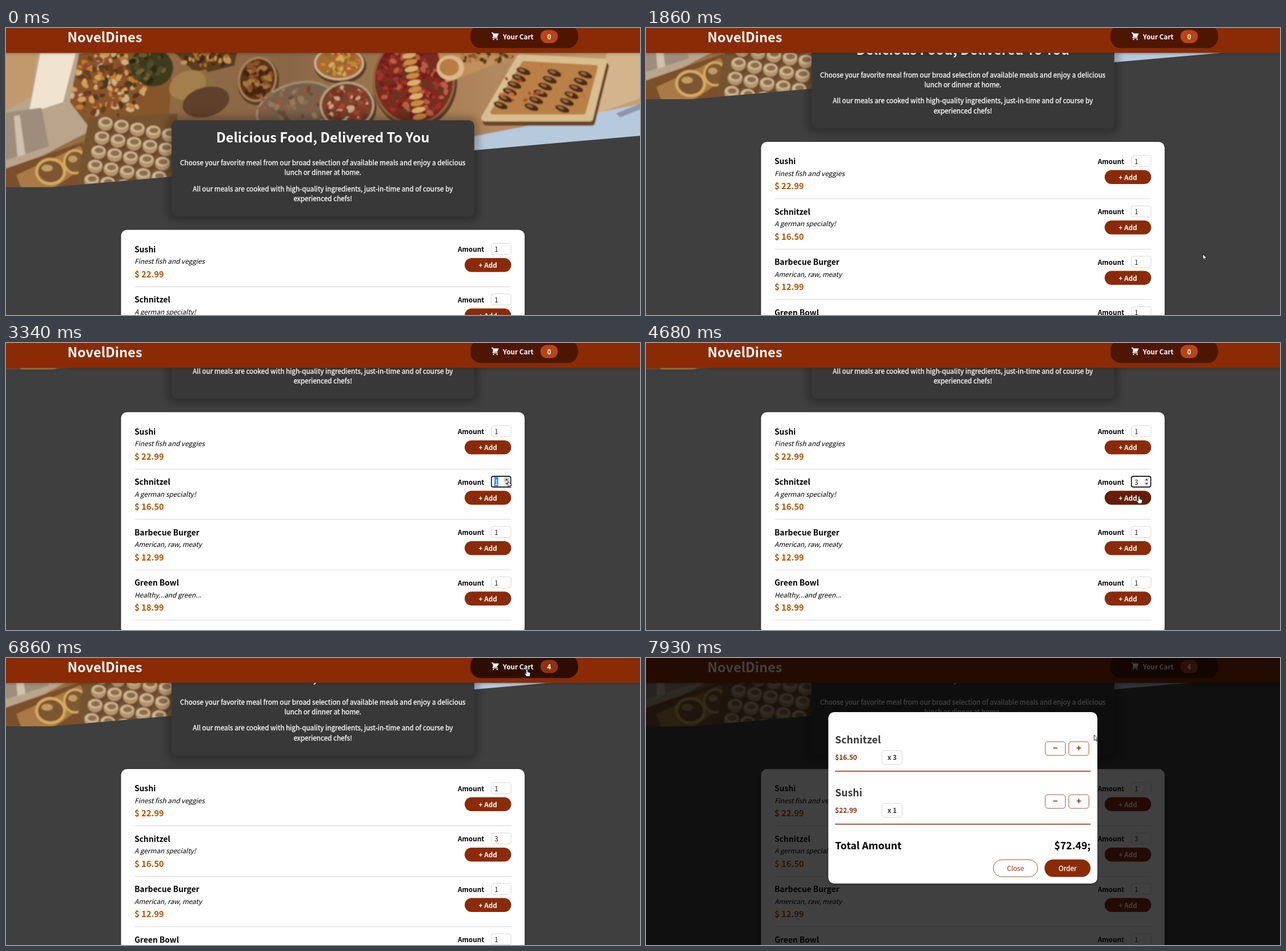
These frames come from a looping animation (1110x504 px, 8000 ms). An HTML page:

```html
<!DOCTYPE html>
<html lang="en">
<head>
<meta charset="utf-8">
<title>Meal ordering</title>
<style>
  html, body { margin: 0; width: 100%; height: 100%; overflow: hidden; background: #3f3f3f; }
  svg { display: block; width: 100vw; height: 100vh; }
  text { font-family: "Noto Sans CJK JP", "Noto Sans JP", "Noto Sans CJK SC", "Noto Sans", sans-serif; white-space: pre; }
  .intro { stroke: #fff; stroke-width: .3px; }
</style>
</head>
<body>
<svg id="stage" viewBox="0 0 1110 504" xmlns="http://www.w3.org/2000/svg"></svg>
<script>
const LOOP = 8000;
const REM = 11.78;
const MID = 554.7;
const RUST = '#8a2b06';
const ROW_TOP = 377.9, ROW_STEP = 88.5;

// ---- markup helpers ----
const text = (x, y, s, o = {}) =>
  `<text x="${x}" y="${y}" font-size="${o.size || REM}" font-weight="${o.bold ? 700 : 400}"` +
  ` fill="${o.fill || '#000'}" text-anchor="${o.anchor || 'start'}"` +
  `${o.italic ? ' font-style="italic"' : ''}${o.id ? ` id="${o.id}"` : ''}>${s}</text>`;
const rect = (x, y, w, h, r, fill, extra = '') =>
  `<rect x="${x}" y="${y}" width="${w}" height="${h}" rx="${r}" fill="${fill}" ${extra}/>`;
const oval = (x, y, rx, ry, fill, rot = 0) =>
  `<ellipse cx="${x}" cy="${y}" rx="${rx}" ry="${ry}" fill="${fill}" transform="rotate(${rot} ${x} ${y})"/>`;
const poly = (points, fill, extra = '') => `<polygon points="${points}" fill="${fill}" ${extra}/>`;
const outline = (x, y, w, h, r, color, width = 0.8) =>
  rect(x, y, w, h, r, '#fff', `stroke="${color}" stroke-width="${width}"`);

// ---- buffet picture ----
let seed = 7;
const rand = () => (seed = (seed * 16807) % 2147483647) / 2147483647;

function scatter(cx, cy, rx, ry, n, size, colors) {
  let out = '';
  for (let i = 0; i < n; i++) {
    const a = rand() * Math.PI * 2, d = Math.sqrt(rand());
    const x = (cx + Math.cos(a) * d * rx).toFixed(1), y = (cy + Math.sin(a) * d * ry).toFixed(1);
    const r = size * (0.6 + rand() * 0.7);
    out += oval(x, y, r.toFixed(1), (r * 0.65).toFixed(1), colors[i % colors.length], Math.round(rand() * 180));
  }
  return out;
}

function cups() {
  let out = '';
  for (let r = 0; r < 5; r++) {
    for (let c = 0; c < 5; c++) {
      const x = 174 + c * 28 - r * 6, y = 168 + r * 25 + c * 5;
      out += oval(x + 2, y + 6, 14, 13, '#6b4a2e') + oval(x, y, 13, 12, '#b3946d') +
        oval(x, y - 3, 12, 8, '#d0b795') + oval(x + 1, y - 3, 8, 5, '#8d6e4c');
    }
  }
  return out;
}

function rolls() {
  let out = '';
  for (let r = 0; r < 3; r++) {
    for (let i = 0; i < 6; i++) {
      const x = 866 + r * 54 + i * 8, y = 136 - i * 12 + r * 3;
      out += oval(x, y, 13, 5.5, '#4b2a17', 20) + oval(x - 3, y - 2, 6, 2, '#94704c', 20);
    }
  }
  return out + scatter(945, 105, 82, 42, 12, 5, ['#b5452a', '#cf6a3d']);
}

function bowl(x, y, rx, ry, rim, fill, n, size, colors, rot = 0) {
  return oval(x + 2, y + 4, rx + 2, ry + 2, '#5b3c24', rot) + oval(x, y, rx, ry, rim, rot) +
    oval(x, y, rx - 4, ry - 4, fill, rot) + scatter(x, y, rx - 9, ry - 9, n, size, colors);
}

const photo = () => `<g clip-path="url(#slant)"><g filter="url(#soft)">
  ${rect(-10, 0, 1130, 300, 0, 'url(#table)')}
  ${poly('-10,40 135,40 112,130 150,180 100,205 -10,265', '#b9a48c')}
  ${poly('-10,40 55,40 45,120 -10,150', '#c09a6c')}
  ${poly('60,44 122,44 100,130 40,150', '#f0e3cf')}
  ${poly('-10,150 62,140 75,208 -10,235', '#9f8d7b')}
  ${poly('14,155 24,153 34,222 20,226', '#d0c2af')}
  ${poly('-10,250 134,200 156,236 130,300 -10,300', '#7a5029')}
  ${poly('18,258 130,207 146,238 70,290 30,290', '#a97a45')}
  ${oval(78, 252, 27, 24, '#d6ab60')}${oval(78, 252, 22, 19, '#7b5530')}${oval(72, 246, 10, 6, '#c39b60')}
  ${oval(121, 235, 21, 22, '#d6ab60')}${oval(121, 235, 17, 18, '#805931')}${oval(117, 230, 8, 6, '#c39b60')}
  ${poly('128,44 250,44 290,90 285,165 150,180 112,130', '#86552b')}
  ${scatter(180, 105, 66, 62, 170, 6, ['#c77830', '#6b3c1a', '#d39f5c', '#8e4b2a', '#4c3a1e', '#cdb289'])}
  ${oval(255, 68, 38, 34, '#3c3b1e', 20)}${scatter(250, 66, 32, 28, 34, 6, ['#4f4a26', '#2c2a17', '#6f5f30'])}
  ${poly('145,158 300,150 300,290 120,290', '#74522f')}
  ${cups()}
  ${poly('292,40 405,40 400,66 335,82', '#5d3a1e')}${scatter(350, 54, 45, 14, 34, 5, ['#a56b2f', '#c4944f', '#3f2a18'])}
  ${poly('290,90 350,72 368,110 322,135 290,140', '#8d6d3f')}${oval(318, 100, 34, 24, '#a27f4c', -25)}
  ${oval(350, 130, 42, 26, '#60402a', -15)}
  ${bowl(440, 90, 34, 40, '#a58058', '#5a3219', 44, 6, ['#8a5229', '#a8743d', '#472411'], 15)}
  ${bowl(507, 140, 72, 44, '#a08c72', '#79614a', 44, 6, ['#95573c', '#8a6d50', '#684c38', '#96795c'], -18)}
  ${bowl(583, 62, 44, 30, '#c9b193', '#a86c2e', 64, 5, ['#d08438', '#7f6f33', '#b95a2d', '#d3a85c'])}
  ${bowl(597, 136, 48, 42, '#b59c7e', '#734329', 64, 5.5, ['#a8402f', '#c9a283', '#6d3423', '#8c3826'])}
  ${bowl(714, 92, 72, 78, '#93643f', '#7d2a1e', 140, 6, ['#a0302a', '#741d1c', '#b85b42', '#5c3a22'])}
  ${Array.from({ length: 10 }, (_, i) => oval(706 + i * 2, 48 + i * 12, 12, 5, i % 2 ? '#c98a42' : '#d9b06a', -12)).join('')}
  ${poly('755,40 920,40 835,72 770,96', '#c08f5c')}
  ${oval(778, 70, 24, 22, '#dbb888')}${oval(776, 69, 17, 15, '#b97b45')}
  ${scatter(842, 50, 45, 10, 30, 5, ['#8c5a2b', '#b7803f', '#573518'])}
  ${poly('1052,40 1120,40 1120,120 1035,150', '#d4b48c')}
  ${poly('820,190 1120,132 1120,205 810,225', '#b7c9dc')}${poly('1068,150 1120,129 1120,139 1075,157', '#8a97a8')}
  <g stroke-linejoin="round">
    ${poly('838,158 900,52 1046,60 1022,158', '#6b4526', 'stroke="#6b4526" stroke-width="13" transform="translate(3 7)"')}
    ${poly('838,158 900,52 1046,60 1022,158', '#d9bf90', 'stroke="#d9bf90" stroke-width="12"')}
    ${poly('852,148 907,62 1032,69 1011,148', '#b98146', 'stroke="#b98146" stroke-width="8"')}
  </g>
  ${rolls()}
</g></g>`;

// ---- page ----
const meals = [
  ['Sushi', 'Finest fish and veggies', '22.99'],
  ['Schnitzel', 'A german specialty!', '16.50'],
  ['Barbecue Burger', 'American, raw, meaty', '12.99'],
  ['Green Bowl', 'Healthy...and green...', '18.99'],
];

function meal([name, note, price], i) {
  const y = ROW_TOP + i * ROW_STEP;
  return text(225, y + 16, name, { size: 13.78, bold: 1 }) +
    text(225, y + 36.4, note, { italic: 1 }) +
    text(225, y + 60, '$ ' + price, { size: 14.72, bold: 1, fill: '#ad5502' }) +
    rect(225, y + 76, 659.5, 0.8, 0, '#ccc') +
    text(837.2, y + 15.1, 'Amount', { bold: 1, anchor: 'end' }) +
    outline(849.5, y + 0.4, 34.7, 19.4, 3.7, '#ccc') +
    (i === 1 ? activeField(y) : '') +
    text(855.2, y + 15.1, '1', { id: 'qty' + i, fill: '#222' }) +
    rect(803, y + 26.1, 81.5, 24.5, 12.2, RUST, `id="add${i}"`) +
    text(843.7, y + 43.5, '+ Add', { bold: 1, fill: '#fff', anchor: 'middle' });
}

const activeField = y => `
  <g id="ring">${outline(849.9, y + 0.7, 33.8, 18.8, 3.2, '#101010', 1.6)}</g>
  <g id="spin">${rect(871.5, y + 2.2, 10, 15.8, 0, '#efefef')}
    ${rect(871.5, y + 2.2, 10, 7.9, 0, '#d0d0d0', 'id="spinUp"')}${rect(871.5, y + 10.1, 10, 7.9, 0, '#d0d0d0', 'id="spinDown"')}
    <path d="M873.8 ${y + 7.9}l2.7-3.3 2.7 3.3zM873.8 ${y + 12.3}l2.7 3.3 2.7-3.3z" fill="#444"/></g>
  ${rect(854.9, y + 1.9, 7, 16.4, 0, '#3390ff', 'id="picked"')}`;

const intro = [
  [241.1, 'Choose your favorite meal from our broad selection of available meals and enjoy a delicious'],
  [258.1, 'lunch or dinner at home.'],
  [286.9, 'All our meals are cooked with high-quality ingredients, just-in-time and of course by'],
  [304, 'experienced chefs!'],
];

const page = () => `<g id="page">
  ${photo()}
  ${rect(282.2, 155.3, 545.2, 184, 16, '#000', 'opacity=".25" filter="url(#blurBig)"')}
  ${rect(289.7, 162, 530.2, 169, 10.3, '#383838')}
  ${text(MID, 201, 'Delicious Food, Delivered To You', { size: 23.55, bold: 1, fill: '#fff', anchor: 'middle' })}
  <g class="intro">${intro.map(([y, s]) => text(MID, y, s, { fill: '#fff', anchor: 'middle' })).join('')}</g>
  ${rect(201.4, 355.9, 706.6, 389.3, 10.3, '#000', 'opacity=".25" filter="url(#blur)"')}
  ${rect(201.4, 354.4, 706.6, 389.3, 10.3, '#fff')}
  ${meals.map(meal).join('')}
</g>`;

const header = () => `
  ${rect(-10, -10, 1130, 55, 0, '#000', 'opacity=".25" filter="url(#blur)"')}
  ${rect(0, 0, 1110, 43.7, 0, RUST)}
  ${text(107.4, 24.6, 'NovelDines', { size: 23.55, bold: 1, fill: '#fff' })}
  <g id="cart">
    ${rect(813, -5.3, 188.5, 40.6, 18.4, '#4d1601', 'id="cartBg"')}
    <path transform="translate(848.3 7) scale(.795)" fill="#fff" d="M3 1a1 1 0 0 0 0 2h1.2l1.7 6.7-.9.9C3.7 11.8 4.6 14 6.4 14H15a1 1 0 0 0 0-2H6.4l1-1H14a1 1 0 0 0 .9-.6l3-6A1 1 0 0 0 17 3H6.3L6 1.8A1 1 0 0 0 5 1zM16 16.5a1.5 1.5 0 1 1-3 0 1.5 1.5 0 0 1 3 0zM6.5 18a1.5 1.5 0 1 0 0-3 1.5 1.5 0 0 0 0 3z"/>
    ${text(870, 19.7, 'Your Cart', { bold: 1, fill: '#fff' })}
    ${rect(935.7, 3.5, 30.5, 23, 11.5, '#b94517', 'id="badge"')}
    ${text(951, 19.7, '0', { id: 'count', bold: 1, fill: '#fff', anchor: 'middle' })}
  </g>`;

// ---- cart dialog ----
function cartItem(name, price, n, y) {
  const sign = (x, s) => outline(x, y + 52, 35.2, 24, 4.4, RUST) +
    text(x + 17.6, y + 69.4, s, { size: 14.72, bold: 1, fill: RUST, anchor: 'middle' });
  return text(331, y + 55, name, { size: 17.66, bold: 1, fill: '#363636' }) +
    text(331, y + 84.2, price, { bold: 1, fill: RUST }) +
    outline(413.2, y + 67.6, 35.2, 24, 4.4, '#ccc') +
    text(430.8, y + 84.2, 'x ' + n, { bold: 1, fill: '#363636', anchor: 'middle' }) +
    sign(699, '−') + sign(740.2, '+') + rect(331, y + 103, 447.3, 1.5, 0, RUST);
}

const dialog = () => `<g id="shade">
  ${rect(0, 0, 1110, 504, 0, '#000', 'opacity=".75"')}
  <g id="dialog">
    ${rect(319.2, 96.5, 471, 301, 10.3, '#000', 'opacity=".25" filter="url(#blur)"')}
    ${rect(319.2, 95, 471, 301, 10.3, '#fff')}
    ${cartItem('Schnitzel', '$16.50', 3, 95)}
    ${cartItem('Sushi', '$22.99', 1, 188)}
    ${text(331, 336.3, 'Total Amount', { size: 17.66, bold: 1 })}
    ${text(778.3, 336.3, '$72.49;', { size: 17.66, bold: 1, anchor: 'end' })}
    ${outline(608, 354.2, 77.8, 30, 15, RUST)}
    ${text(646.9, 374, 'Close', { fill: RUST, anchor: 'middle' })}
    ${rect(697.7, 353.8, 80.6, 30.8, 15.4, RUST)}
    <g class="intro">${text(738, 374, 'Order', { fill: '#fff', anchor: 'middle' })}</g>
  </g>
</g>`;

const pointer = `<g id="pointer" fill="#fff" stroke="#000" stroke-width=".8" stroke-linejoin="round">
  <path id="arrow" d="M0 0V9.6l2.2-2 1.5 3.5 1.6-.7-1.5-3.4h3z"/>
  <path id="hand" d="M-1.3 1.2a1.3 1.3 0 0 1 2.6 0V5l3.2.8c1.2.3 1.6.9 1.5 2L5.2 11v2H-.8L-3.8 8.4c-.5-.9.6-1.8 1.5-1l1 1z"/>
</g>`;

document.getElementById('stage').innerHTML = `<defs>
  <linearGradient id="table"><stop offset="0" stop-color="#9a7048"/><stop offset=".45" stop-color="#8a6746"/><stop offset=".75" stop-color="#b0865c"/><stop offset="1" stop-color="#c7a276"/></linearGradient>
  <clipPath id="slant"><path d="M0 43H1110V189.2L80 279.5H0z"/></clipPath>
  <filter id="soft" x="0" y="0" width="100%" height="100%"><feGaussianBlur stdDeviation="1.1"/></filter>
  <filter id="blur" x="-10%" y="-40%" width="120%" height="180%"><feGaussianBlur stdDeviation="2.9"/></filter>
  <filter id="blurBig" x="-10%" y="-20%" width="120%" height="140%"><feGaussianBlur stdDeviation="6.6"/></filter>
</defs>` + rect(0, 0, 1110, 504, 0, '#3f3f3f') + page() + header() + dialog() + pointer;

// ---- motion ----
const $ = id => document.getElementById(id);
const set = (id, name, value) => $(id).setAttribute(name, value);
const show = (id, on) => set(id, 'visibility', on ? 'visible' : 'hidden');
const clamp = u => Math.min(1, Math.max(0, u));
const smooth = u => u * u * (3 - 2 * u);
const easeOut = u => 1 - (1 - u) ** 2;

// keys: [time, value, value...], eased between neighbours
function track(keys, t, ease) {
  let i = 0;
  while (i < keys.length - 2 && t >= keys[i + 1][0]) i++;
  const [a, b] = [keys[i], keys[i + 1]];
  const u = ease(clamp((t - a[0]) / (b[0] - a[0])));
  return a.slice(1).map((v, j) => v + (b[j + 1] - v) * u);
}

const scrollKeys = [[1610, 0], [2019, 233], [6450, 233], [6700, 159.5]];
const pointerKeys = [
  [1130, 1106, 500], [1500, 975, 397], [2020, 975, 397], [2420, 897, 300], [2680, 879, 243],
  [3340, 879, 243], [3600, 877, 238], [3750, 876, 235], [4150, 876, 235], [4490, 863, 269],
  [5240, 863, 269], [5620, 850, 179.5], [6480, 850, 179.5], [6860, 912, 19.5], [7440, 912, 19.5], [7930, 784.5, 135],
];
const bumpKeys = [[0, 1], [30, 0.9], [90, 1.1], [150, 1.15], [300, 1]];
const FIRST_ADD = 4870, SECOND_ADD = 5800, OPEN = 7135;

// the page scrolls in visible 80 ms steps
const stepped = t => Math.floor((t - 20) / 80) * 80 + 20;

function draw(t) {
  const scroll = Math.round(track(scrollKeys, stepped(t), smooth)[0] * 2) / 2;
  const [x, y] = track(pointerKeys, t, smooth);
  const open = t >= OPEN;
  const over = (l, top, w, h) => !open && t > 1150 && x >= l && x <= l + w && y >= top && y <= top + h;

  set('page', 'transform', `translate(0 ${-scroll})`);

  let hand = false;
  meals.forEach((_, i) => {
    const hot = over(803, ROW_TOP + i * ROW_STEP + 26.1 - scroll, 81.5, 24.5) && y > 44;
    set('add' + i, 'fill', hot ? '#641e03' : RUST);
    hand = hand || hot;
  });

  const field = ROW_TOP + ROW_STEP - scroll;
  const focus = t >= 2890 && t < FIRST_ADD;
  const picked = focus && t < 3600;
  show('ring', focus);
  show('picked', picked);
  show('spin', focus || over(849, field, 35.3, 20));
  set('spinUp', 'opacity', +over(871, field, 13, 10));
  set('spinDown', 'opacity', +over(871, field + 10, 13, 10));
  $('qty1').textContent = t < 3600 ? 1 : t < 4150 ? 2 : 3;
  set('qty1', 'fill', picked ? '#fff' : '#222');

  const cartHot = over(813, 0, 188.5, 35);
  const [size] = track(bumpKeys, t - (t < SECOND_ADD ? FIRST_ADD : SECOND_ADD), easeOut);
  set('cart', 'transform', `translate(907.2 15) scale(${size}) translate(-907.2 -15)`);
  set('cartBg', 'fill', cartHot ? '#2c0d00' : '#4d1601');
  set('badge', 'fill', cartHot ? '#92320c' : '#b94517');
  $('count').textContent = t < FIRST_ADD ? 0 : t < SECOND_ADD ? 3 : 4;

  const u = easeOut(clamp((t - OPEN) / 300));
  set('shade', 'display', open ? 'inline' : 'none');
  set('dialog', 'opacity', u);
  set('dialog', 'transform', `translate(0 ${-35.3 * (1 - u)})`);

  hand = hand || cartHot;
  set('pointer', 'transform', `translate(${x} ${y})`);
  set('pointer', 'display', t < 1150 ? 'none' : 'inline');
  show('arrow', !hand);
  show('hand', hand);
}

const start = performance.now();
function tick() {
  draw((performance.now() - start) % LOOP);
  requestAnimationFrame(tick);
}
tick();
</script>
</body>
</html>
```
